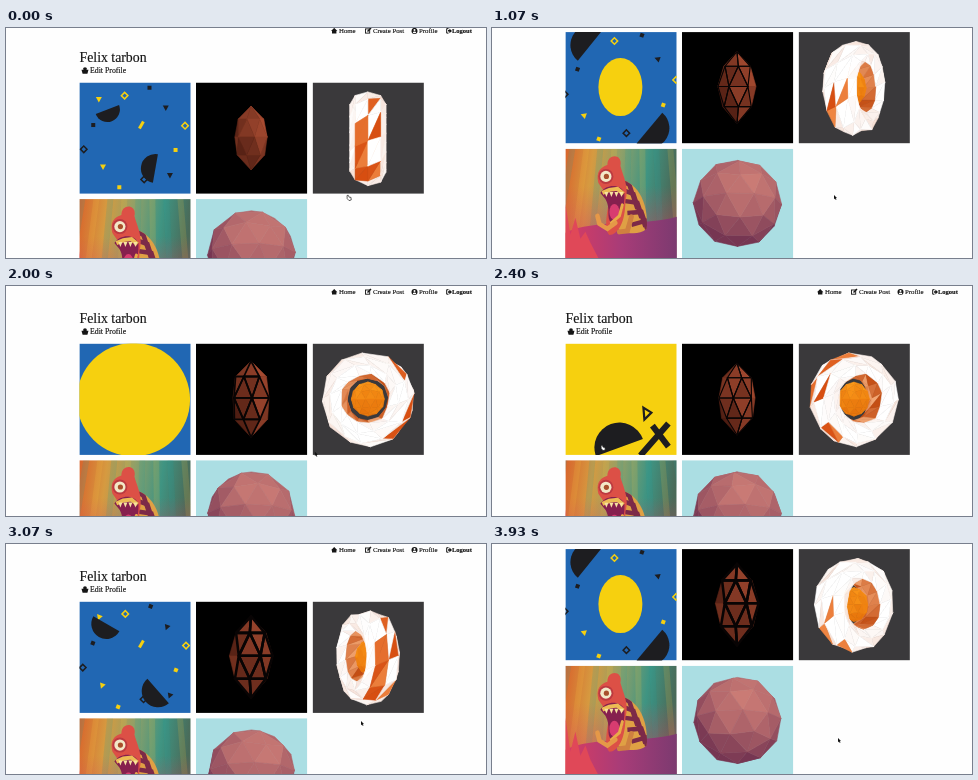
An HTML page with a canvas that plays this animation: 480 px wide and 230 px high, repeating every 3.99 s.

```html
<!DOCTYPE html>
<html lang="en">
<head>
<meta charset="utf-8">
<title>Profile gallery</title>
<style>
html, body { margin: 0; width: 100%; height: 100%; overflow: hidden; background: #fefefe; }
svg, canvas { position: absolute; left: 0; top: 0; width: 480px; height: 230px; }
text { font-family: "Liberation Serif", "Times New Roman", serif; fill: #151515; stroke: #151515; stroke-width: .15px; }
</style>
</head>
<body>
<svg viewBox="0 0 480 230">
  <g id="head">
    <text x="73.5" y="-21" font-size="13.8">Felix tarbon</text>
    <text x="84" y="-9.6" font-size="7.8">Edit Profile</text>
    <g font-size="6.8">
      <text x="333" y="-49.8">Home</text>
      <text x="367" y="-49.8">Create Post</text>
      <text x="413" y="-49.8">Profile</text>
      <text x="446" y="-49.8" font-size="6.5" font-weight="bold">Logout</text>
    </g>
  </g>
</svg>
<canvas id="stage"></canvas>
<script>
const LOOP = 3990, STEP = 66.5, SIZE = 111.3, PITCH = 116.6, TAU = Math.PI * 2, RAD = Math.PI / 180;
const canvas = document.getElementById('stage'), head = document.getElementById('head');
const dpr = window.devicePixelRatio || 1;
canvas.width = 480 * dpr;
canvas.height = 230 * dpr;
const c = canvas.getContext('2d');
const BLUE = '#2167b3', YELLOW = '#f6d00f', INK = '#1d1d20';

const clamp = x => Math.max(0, Math.min(1, x));
const ramp = (x, a, b) => clamp((x - a) / (b - a));
const smooth = (x, a, b) => { const k = ramp(x, a, b); return k * k * (3 - 2 * k); };
const mix = (a, b, k) => a + (b - a) * k;
const rand = n => { const s = Math.sin(n * 12.9898 + 4.1) * 43758.5453; return s - Math.floor(s); };
const shade = (a, b, k) => `rgb(${a.map((v, j) => Math.round(mix(v, b[j], clamp(k)))).join()})`;

// rows are [step, value, ...]
function key(i, rows) {
  let n = 1;
  while (n < rows.length - 1 && rows[n][0] < i) n++;
  const a = rows[n - 1], b = rows[n], k = ramp(i, a[0], b[0]);
  return a.slice(1).map((v, j) => mix(v, b[j + 1], k));
}

function poly(pts, fill) {
  c.beginPath();
  pts.forEach(p => c.lineTo(p[0], p[1]));
  c.closePath();
  if (fill) { c.fillStyle = fill; c.fill(); }
}
function oval(x, y, rx, ry, fill) {
  c.beginPath();
  c.ellipse(x, y, rx, ry, 0, 0, TAU);
  c.fillStyle = fill;
  c.fill();
}
function line(pts, color, width) {
  c.beginPath();
  pts.forEach(p => c.lineTo(p[0], p[1]));
  c.strokeStyle = color;
  c.lineWidth = width;
  c.stroke();
}
function blob(path, fill) {
  c.fillStyle = fill;
  c.fill(new Path2D(path));
}
function half(x, y, r, deg) {
  c.beginPath();
  c.arc(x, y, r, (deg - 90) * RAD, (deg + 90) * RAD);
  c.fillStyle = INK;
  c.fill();
}
function back(fill) {
  c.fillStyle = fill;
  c.fillRect(0, 0, SIZE, SIZE);
}

// ---- solids ----
const sub = (a, b) => a.map((v, j) => v - b[j]);
const dot = (a, b) => a[0] * b[0] + a[1] * b[1] + a[2] * b[2];
const cross = (a, b) => [a[1] * b[2] - a[2] * b[1], a[2] * b[0] - a[0] * b[2], a[0] * b[1] - a[1] * b[0]];
const unit = a => { const l = Math.hypot(...a) || 1; return a.map(v => v / l); };
const mid = (a, b) => a.map((v, j) => (v + b[j]) / 2);
const center = p => p[0].map((v, j) => (v + p[1][j] + p[2][j]) / 3);

function face(p, seed, from = [0, 0, 0]) {
  const n = cross(sub(p[1], p[0]), sub(p[2], p[0]));
  return { p: dot(n, sub(center(p), from)) < 0 ? [p[0], p[2], p[1]] : p, seed };
}
// triangles between two tips and staggered rings given as [y, radius]
function stack(sides, tip, levels) {
  const rings = levels.map(([y, r], k) => Array.from({ length: sides }, (_, n) => {
    const a = (n + k / 2) * TAU / sides;
    return [r * Math.cos(a), y, r * Math.sin(a)];
  }));
  const out = [], last = rings[rings.length - 1];
  for (let n = 0; n < sides; n++) {
    const m = (n + 1) % sides;
    out.push([[0, -tip, 0], rings[0][n], rings[0][m]], [[0, tip, 0], last[n], last[m]]);
    for (let k = 1; k < rings.length; k++) {
      const a = rings[k - 1], b = rings[k];
      out.push([a[n], a[m], b[n]], [b[n], b[m], a[m]]);
    }
  }
  return out;
}
const split = tris => tris.flatMap(([a, b, d]) => {
  const x = unit(mid(a, b)), y = unit(mid(b, d)), z = unit(mid(d, a));
  return [[a, x, z], [x, b, y], [z, y, d], [x, y, z]];
});
const ball = split(stack(5, 1, [[-.447, .894], [.447, .894]])).map((p, n) => face(p, n));
const gem = stack(6, 32, [[-19, 13], [-1, 17], [17, 14]]).map((p, n) => face(p, n));

const donut = (() => {
  const N = 12, M = 8, out = [];
  // one trip round the tube shifts by two sides, so the twist closes
  const point = (u, v) => {
    if (v === M) return point(u + 2, 0);
    const seed = u % N * M + v, w = v * TAU / M;
    const a = (u + v * 2 / M + .3 * rand(seed)) * TAU / N;
    const r = 34.5 + 13 * Math.cos(w) + (rand(seed + 200) - .5) * 2.5;
    return [r * Math.cos(a), r * Math.sin(a), 18 * Math.sin(w)];
  };
  for (let u = 0; u < N; u++) for (let v = 0; v < M; v++) {
    const a = (u + .5 + (v + .5) * 2 / M) * TAU / N;
    const from = [34.5 * Math.cos(a), 34.5 * Math.sin(a), 0];
    const [p, q, r, s] = [point(u, v), point(u + 1, v), point(u + 1, v + 1), point(u, v + 1)];
    for (const t of [[p, q, r], [p, r, s]])
      out.push({ ...face(t, out.length, from), side: Math.cos((v + .5) * TAU / M) });
  }
  const core = ball.map(f => ({ ...f, core: true, p: f.p.map(p => [p[0] * 17, p[1] * 17, p[2] * 11]) }));
  return out.concat(core);
})();

function solid(mesh, x, y, size, yaw, pitch, color, gap = 0) {
  const [cy, sy, cp, sp] = [yaw, pitch].flatMap(a => [Math.cos(a * RAD), Math.sin(a * RAD)]);
  const turn = ([a, b, d]) => {
    const z = d * cy - a * sy;
    return [a * cy + d * sy, b * cp - z * sp, b * sp + z * cp];
  };
  c.lineJoin = 'round';
  const seen = mesh.map(f => {
    const p = f.p.map(turn);
    return { f, n: unit(cross(sub(p[1], p[0]), sub(p[2], p[0]))), z: center(p)[2],
      at: p.map(q => [x + q[0] * size, y + q[1] * size]) };
  }).filter(o => o.n[2] > 0).sort((a, b) => a.z - b.z);
  for (const o of seen) {
    const fill = color(o.f, o.n);
    poly(o.at, fill);
    c.strokeStyle = fill;
    c.lineWidth = .6;
    c.stroke();
  }
  if (gap > .2) for (const o of seen) if (o.n[2] > .45) {
    poly(o.at);
    c.strokeStyle = '#080404';
    c.lineWidth = gap;
    c.stroke();
  }
}

// ---- tile pictures, each drawn in a box of SIZE ----
function bit(kind, color, x, y, a) {
  c.save();
  c.translate(x, y);
  c.rotate(a);
  c.fillStyle = c.strokeStyle = color;
  c.lineWidth = 1.5;
  if (kind === 0) c.strokeRect(-2.3, -2.3, 4.6, 4.6);
  if (kind === 1) c.fillRect(-2, -2, 4, 4);
  if (kind === 2) poly([[-3, -2.5], [3, -2.5], [0, 3]], color);
  c.restore();
}
// small pieces on two rings round the middle, drifting outwards
function confetti(t, k) {
  const out = (1 + .08 * ramp(t, 0, 16) + 1.6 * ramp(t, 16.5, 22)) * k;
  for (let n = 0; n < 12; n++) {
    const a = -1.8 + n * TAU / 12 + .1 * ramp(t, 0, 16), r = (n % 2 ? 52 : 43) * out;
    bit(n % 3, n % 4 % 3 ? INK : YELLOW, 55 + r * Math.cos(a), 55 + r * Math.sin(a), n % 3 ? t * .12 : .78);
  }
  if (t < 6) line([[60, 46], [64, 39]], YELLOW, 3 * k);
}
function halves(t, k) {
  const e = 1 - (1 - ramp(t, 0, 16)) ** 2, out = 60 * ramp(t, 16.5, 22), r = (12.5 + 7.5 * e) * k;
  half(mix(55, 28 - 3 * e, k) - out, mix(55, 27 - 14 * e, k) - out, r, 69 + 150 * e);
  half(mix(55, 76 + 8 * e, k) + out, mix(55, 86 + 10 * e, k) + out, r + 2 * (1 - e), 190 - 150 * e);
}
function shapes(i) {
  const t = i % 43;
  back(t > 32 ? YELLOW : BLUE);
  if (t < 24) {
    confetti(t, 1);
    halves(t, 1);
    if (t > 3 && t < 9) {
      c.beginPath();
      c.ellipse(55, 55.5, 18, 24, 0, -1.1, -1.1 + TAU * .93 * ramp(t, 3, 7));
      c.strokeStyle = YELLOW;
      c.lineWidth = 3.6;
      c.stroke();
    } else if (t >= 9) {
      const k = ramp(t, 8, 12);
      oval(55, 55, mix(18, 22, k), mix(24, 29, k), YELLOW);
    }
  }
  if (t > 17 && t < 33) {
    const k = ramp(t, 17, 23), w = ramp(t, 26, 32);
    oval(54, 58, 24.5 * k, 32 * k, INK);
    oval(54, 56, 85 * w, 85 * w, YELLOW);
  }
  if (t > 32 && t < 40) {
    c.save();
    c.translate(0, (36 - t) * 9);
    half(54, 104, 25, 250 + (t - 36) * 12);
    line([[75, 112], [103, 80]], INK, 6);
    line([[87, 82], [103, 103]], INK, 6);
    poly([[78, 64], [86, 69], [79, 76]]);
    c.lineWidth = 2.2;
    c.stroke();
    c.restore();
  }
  if (t > 38) {
    const w = ramp(t, 38, 42);
    oval(55, 55, 85 * w, 85 * w, BLUE);
    confetti(0, w);
    halves(0, w);
  }
}

function crystal(i) {
  back('#000');
  const wave = Math.sin(Math.PI * i / 13) ** 2;
  solid(gem, 55, 55.5, 1 + .28 * wave, 12 + i * 360 / 13, 0, (f, n) =>
    shade([72, 26, 16], [192, 88, 58], .42 + n[0] * .2 - n[1] * .3 + (rand(f.seed) - .5) * .35), 2.6 * wave);
}

function ring(i) {
  back('#3a393b');
  const [yaw] = key(i, [[0, -90], [7, 0], [36, 211], [59, 407]]);
  solid(donut, 55.3, 55.5, 1, yaw, 0, (f, n) => {
    const r = rand(f.seed * 3.7);
    if (f.core) return shade([226, 108, 8], [255, 158, 28], .5 - n[1] * .3 + (r - .5) * .3);
    if (f.side < -.8) return shade([196, 78, 20], [244, 170, 120], r);
    if (f.side > .8 && n[2] > .45 && r < .55) return shade([212, 72, 12], [246, 150, 80], r * 1.8);
    return shade([236, 190, 168], [255, 255, 255], .6 + n[2] * .5 + (r - .5) * .35);
  });
}

function monster(i) {
  const sway = Math.sin(i * .48);
  const fade = (x, y, ...colors) => {
    const g = c.createLinearGradient(0, 0, x, y);
    colors.forEach((s, n) => g.addColorStop(n / (colors.length - 1), s));
    return g;
  };
  back(fade(SIZE, 15, '#d8642c', '#d69a40', '#8fa068', '#3f9482', '#4a6a58'));
  for (let n = 0; n < 9; n++) {
    const x = n * 14 + sway * 4, foot = x + (n - 4) * 3;
    c.globalAlpha = .16;
    poly([[x, 0], [x + 6, 0], [foot + 4, 85], [foot - 2, 85]], n % 2 ? '#eec23e' : '#1f9a9c');
  }
  c.globalAlpha = 1;
  back(fade(0, SIZE, '#d8406000', '#d8406000', '#d8406055', '#d0306899'));
  blob('M0 84 C30 70 75 78 112 68 V112 H0Z', fade(SIZE, 0, '#d83c62', '#a83c78', '#7c3a70'));
  const spikes = [[0, SIZE]];
  for (let n = 0; n < 6; n++) spikes.push([n * 5, n % 2 ? 84 + n * 2 : 52 + n * 7 + sway * 3]);
  poly(spikes.concat([[34, SIZE]]), '#e04858');
  c.save();
  c.translate(0, Math.sin(i * .8) * .8);
  // striped back
  c.save();
  c.clip(new Path2D('M50 30 C70 30 84 52 81 80 C72 88 54 84 48 76Z'));
  back('#dfa044');
  for (let n = 0; n < 5; n++) line([[50 + n * 4, 28 + n * 12], [64 + n * 4, 36 + n * 9], [72 + n * 4, 60 + n * 9]], '#7c2a48', 4.5);
  c.restore();
  // head, jaw and arms
  blob('M33 34 C30 22 36 18 42 16 C42 4 58 5 55 17 C58 28 64 38 60 52 C60 74 52 86 44 86 C38 80 42 62 44 50Z', '#dc5046');
  blob('M35 44 C42 34 56 36 59 44 C60 60 54 70 46 74 C40 68 46 60 40 50Z', '#86204e');
  oval(49, 63, 5, 8, '#d83c70');
  line([[37, 44], [44, 41], [52, 40], [58, 45]], '#ecbc54', 4);
  for (let n = 0; n < 4; n++) poly([[39 + n * 5, 43], [43 + n * 5, 43], [41 + n * 5, 48]], '#f6e3a0');
  c.lineCap = 'round';
  line([[57, 56], [54, 67], [46, 74]], '#e8aa48', 3);
  line([[50, 74], [42, 80], [34, 75], [32, 67]], '#e59848', 4.5);
  line([[66, 68], [62, 82], [54, 83]], '#cf8040', 5);
  c.lineCap = 'butt';
  oval(40.5, 27.5, 7.5, 7.5, '#bc3a40');
  oval(40.5, 27.5, 5.6, 5.6, '#f2e8c8');
  oval(41, 27.5, 2.6, 2.6, '#a8502c');
  c.restore();
}

function globe(i) {
  back('#abdee3');
  solid(ball, 55.4, 54.7, 44.3, 10 + i * 3, 14, (f, n) =>
    shade([118, 54, 82], [218, 136, 124], .12 + n[2] * .5 - n[1] * .42 + n[0] * .18 + (rand(f.seed) - .5) * .1));
}

// ---- page ----
function icons(top) {
  const ink = '#151515';
  c.save();
  c.translate(0, top);
  blob('M325 -51.8 L328.2 -55 L331.4 -51.8 H330.4 V-49.4 H326 V-51.8Z', ink);
  c.strokeStyle = ink;
  c.lineWidth = .9;
  c.strokeRect(359.5, -54, 4.2, 4.2);
  line([[361.5, -51.5], [365, -55]], ink, 1.4);
  oval(408.5, -52, 3, 3, ink);
  oval(408.5, -53, 1, 1, '#fff');
  oval(408.5, -50.6, 1.7, .9, '#fff');
  line([[442.5, -54.3], [440.7, -54.3], [440.7, -49.8], [442.5, -49.8]], ink, 1);
  blob('M442 -52.8 H443.4 V-54.5 L446 -52 L443.4 -49.6 V-51.3 H442Z', ink);
  blob('M75.5 -13.2 H82.5 L81.4 -9.2 H76.6Z', ink);
  oval(79, -14.1, 1.9, 1.6, ink);
  c.restore();
}
function pointer(i) {
  const [x, y] = key(i, [[29, 342, 168], [36, 110, 160], [40, 108, 47], [43, 398, 6], [46, 355, 178], [50, 346, 195]]);
  c.save();
  c.translate(x, y);
  if (i < 1 || (i > 34 && i < 38)) {
    const hand = 'M-1 -.5 L.2 -.8 L1.2 1.2 L3 1.4 L3.2 4 L1 4.6 L-.8 2.6Z';
    blob(hand, '#fff');
    c.strokeStyle = '#222';
    c.lineWidth = .7;
    c.stroke(new Path2D(hand));
  } else {
    blob('M0 -1 V3.2 L1 2.5 L1.8 4 L2.5 3.6 L1.8 2.2 L3 2Z', '#111');
  }
  c.restore();
}

const tiles = [shapes, crystal, ring, monster, globe];
function draw(i) {
  const down = smooth(i, -1.8, 10.5) - smooth(i, 19, 27.5) + smooth(i, 48.5, 56);
  const top = mix(58, i < 30 ? 4.5 : 5.5, down);
  c.setTransform(dpr, 0, 0, dpr, 0, 0);
  c.clearRect(0, 0, 480, 230);
  head.setAttribute('transform', `translate(0 ${top})`);
  icons(top);
  tiles.forEach((paint, n) => {
    c.save();
    c.translate(73.4 + n % 3 * PITCH, top - .4 + (n > 2 ? PITCH : 0));
    c.beginPath();
    c.rect(0, 0, SIZE, SIZE);
    c.clip();
    paint(i);
    c.restore();
  });
  pointer(i);
}
function tick() {
  draw(Math.floor(performance.now() % LOOP / STEP));
  requestAnimationFrame(tick);
}
tick();
</script>
</body>
</html>
```
